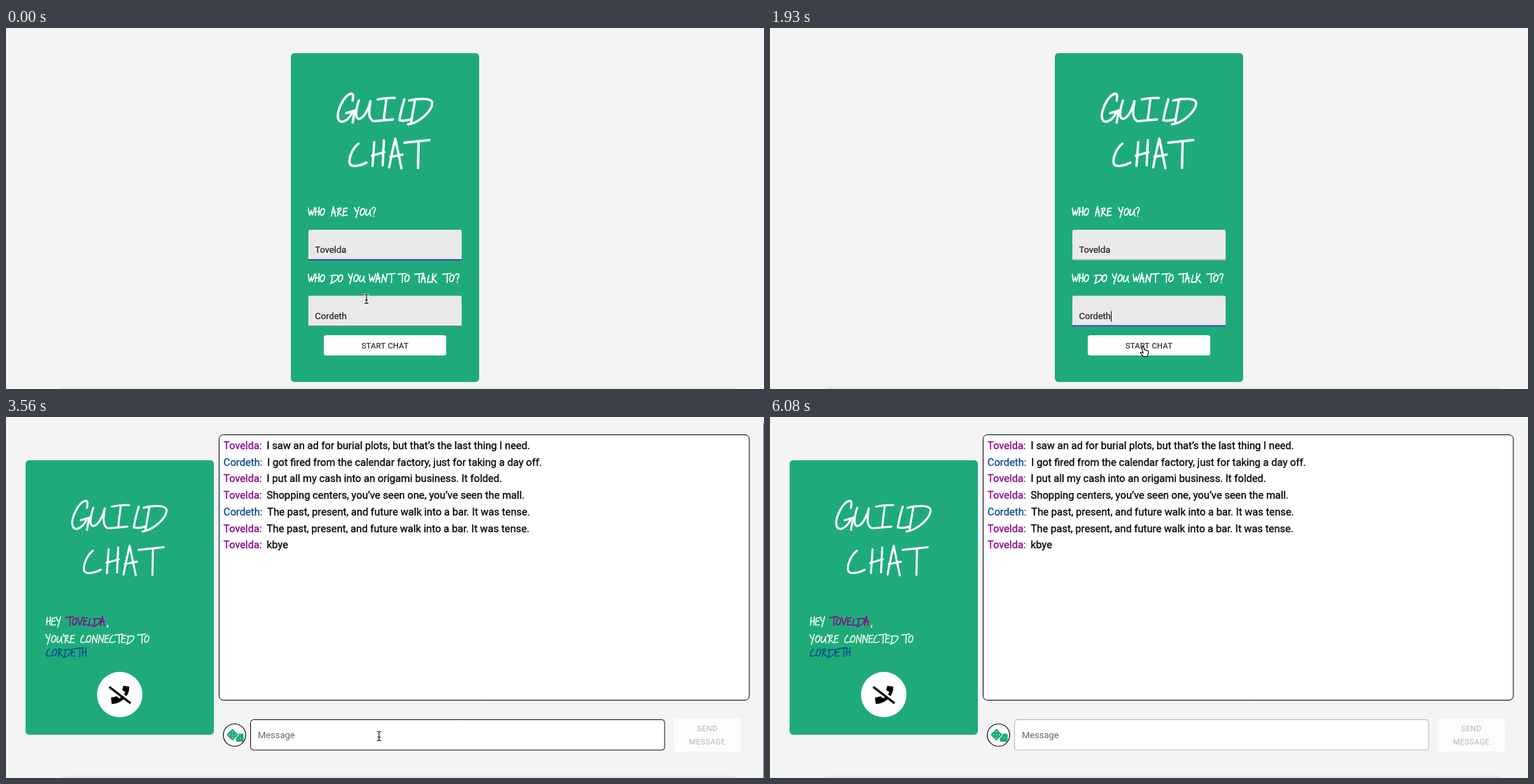
Animation of 1083x517 px, one loop 6.53 s. Source, as an HTML page with a canvas:

```html
<!DOCTYPE html>
<html lang="en">
<head>
<meta charset="utf-8">
<title>Guild Chat</title>
<style>
html, body { margin: 0; width: 100%; height: 100%; overflow: hidden; background: #f4f4f4; }
canvas { display: block; width: 1083px; height: 517px; }
</style>
</head>
<body>
<canvas id="stage" role="img" aria-label="Guild Chat: sign in, then a chat window"></canvas>
<script>
const W = 1083, H = 517, LOOP = 6530, TICK = LOOP / 44;
const canvas = document.getElementById('stage');
const ctx = canvas.getContext('2d');
const ratio = window.devicePixelRatio || 1;
canvas.width = W * ratio;
canvas.height = H * ratio;

const GREEN = '#1eab79', PURPLE = '#8b008b', BLUE = '#0d4a92', INK = '#1c1c1c';
const ME = 'Tovelda', FRIEND = 'Cordeth';

// Handwritten capitals, ten units tall: [advance, strokes]
const titleGlyphs = {
  G: [6.2, 'M5 2.4Q5.5 -.2 4.4 0C2 .6 -.6 6 0 8.6C.7 10.8 3.5 9.4 4.8 6.6M2.8 6.7L5.8 5.8Q5.3 8 5 10'],
  U: [6.2, 'M1 2.4C-.2 6 -.3 8.8 1.1 8.7C2.9 8.4 4.4 5 5 2.6C4.4 6 4.2 8.4 5.8 9.4'],
  I: [7.6, 'M1.2 2Q4 1.4 7.1 1.5M4.2 1.8L3.3 9.2M.1 9.5L6.5 8.9'],
  L: [5, 'M2.2 2Q1 6 .5 9.2Q2.5 9.6 4.6 8.8'],
  D: [8, 'M2.3 2.6L1 10.2M.4 2.4C4 1.6 8.4 1.4 8.3 3.4C8.1 6 4 10 0 10.6'],
  C: [6, 'M3.3 1.2C1.2 2.8 0 6 .2 7.8C.5 9.6 3.5 9 6 7.8'],
  H: [5.2, 'M1 .7L.4 8.9M.2 5.4L4.5 4.2M4.3 .1L3.9 8.7'],
  A: [6, 'M0 9.4Q1 4 2.1 -.5L4.2 9.7M.4 5.8L4.6 5'],
  T: [6.2, 'M-.8 .9L7.8 0M4.1 .4L3.9 9.6']
};
const moreGlyphs = {
  W: [7, 'M0 1Q.6 6 1.2 8.6Q2.6 6 3.2 3.6Q3.4 6 4.2 8.4Q5.8 5 6.6 .6'],
  O: [6.2, 'M3 1.6C.6 2 -.6 8 1.6 8.6C4.6 9 6 3 4 1.6Q3 1 2 2.4'],
  R: [6, 'M1.4 1.4L.6 9.4M.2 2C4 -.4 6 2 1.2 5.4Q3 7.4 5.6 9.4'],
  E: [5.4, 'M1.2 1.6Q.6 5 .4 9L4.6 8.6M.8 5L4 4.4M1 1.6L4.8 1'],
  Y: [5.6, 'M0 .4Q1 4 2.2 4.8M4.6 0Q3 6 1.6 11'],
  N: [6.6, 'M.2 9.4L1.4 1Q3 5 4.6 9Q5 4 6 .4'],
  K: [5.8, 'M1.2 0L.4 9.6M4.8 1Q2 5 .8 5.4Q3 7 5.2 9.8'],
  V: [5.4, 'M0 .8Q1 6 1.8 9Q3.6 5 5.2 .4'],
  '?': [5, 'M.4 2C1.4 -1 5 .4 3.8 3Q2.4 5 2.4 7M2.2 9.4L2.3 9.8'],
  "'": [1.6, 'M.8 0L.6 2'],
  ',': [1.6, 'M.8 9L.2 11.4']
};
const glyphs = { ...titleGlyphs, ...moreGlyphs };
for (const g of Object.values(glyphs)) g[1] = new Path2D(g[1]);

function box(x, y, w, h, r, fill, stroke) {
  ctx.beginPath();
  ctx.roundRect(x, y, w, h, r);
  if (fill) { ctx.fillStyle = fill; ctx.fill(); }
  if (stroke) { ctx.strokeStyle = stroke; ctx.lineWidth = 1; ctx.stroke(); }
}

function disc(x, y, r, fill, stroke) {
  ctx.beginPath();
  ctx.arc(x, y, r, 0, Math.PI * 2);
  ctx.fillStyle = fill;
  ctx.fill();
  if (stroke) { ctx.strokeStyle = stroke; ctx.lineWidth = 1.2; ctx.stroke(); }
}

function text(s, x, y, size, color, { align = 'left', spacing = 0, bold = 0 } = {}) {
  ctx.font = `${size}px Roboto, sans-serif`;
  ctx.letterSpacing = spacing + 'px';
  ctx.textAlign = align;
  ctx.fillStyle = color;
  ctx.fillText(s, x, y);
  if (bold) {
    ctx.strokeStyle = color;
    ctx.lineWidth = bold;
    ctx.strokeText(s, x, y);
  }
  return ctx.measureText(s).width;
}

// Each word is [letters, x]
function write(words, y, size, weight, color = '#fff') {
  ctx.strokeStyle = color;
  ctx.lineCap = ctx.lineJoin = 'round';
  for (const [word, left] of words) {
    let x = left;
    for (const ch of word) {
      const [advance, path] = glyphs[ch];
      ctx.save();
      ctx.translate(x, y);
      ctx.scale(size, size);
      ctx.lineWidth = weight / size;
      ctx.stroke(path);
      ctx.restore();
      x += advance * size;
    }
  }
}

const label = (words, y, weight, color) => write(words, y, 1.35, weight, color);

function title(dx, dy, weight) {
  ctx.save();
  ctx.translate(dx, dy);
  write([['G', 474.5], ['U', 500], ['I', 526], ['L', 560], ['D', 574.5]], 94, 4.15, weight);
  write([['C', 490], ['H', 522], ['A', 547.5], ['T', 572.5]], 160.5, 4.15, weight);
  ctx.restore();
}

function backdrop() {
  ctx.fillStyle = '#f4f4f4';
  ctx.fillRect(0, 0, W, H);
  box(72, 513.5, 978, 40, 14, '#e8e8e8');
}

function field(y, value, line, caret) {
  box(432, y, 219, 43.5, [2, 2, 0, 0], '#e9e9e9');
  ctx.fillStyle = '#8e8e8e';
  ctx.fillRect(432, y + 42.5, 219, 1);
  if (line) {
    ctx.fillStyle = '#3f48b5';
    ctx.fillRect(541.5 - 109.5 * line, y + 42, 219 * line, 2);
  }
  const w = text(value, 441.5, y + 33, 12.9, INK, { bold: 0.2 });
  if (caret) {
    ctx.fillStyle = '#111';
    ctx.fillRect(Math.round(441.5 + w), y + 22, 1, 15);
  }
}

// Radius and strength of the button ripple by step after the press
const ripple = [[21, 0.12], [75, 0.09], [130, 0.05], [180, 0.02]];
const between = (k, a, b) => k >= a && k < b;

function signIn(k) {
  backdrop();
  box(407, 36, 269, 471, 5, GREEN);
  title(0, 0, 3.4);
  label([['WHO', 432], ['ARE', 465], ['YOU?', 498]], 256.5, 1.7);
  const line1 = k < 5 ? 1 : k === 5 ? 0.07 : 0;
  const line2 = k < 5 ? 0 : k === 5 ? 0.6 : k < 20 ? 1 : k === 20 ? 0.07 : 0;
  field(289, ME, line1, between(k, 2, 5));
  label([['WHO', 432], ['DO', 463.5], ['YOU', 489], ['WANT', 519], ['TO', 561],
    ['TALK', 585], ['TO?', 625]], 351.5, 1.7);
  field(383.5, FRIEND, line2, between(k, 5, 8) || between(k, 11, 15) || between(k, 18, 20));

  box(454, 440, 175, 29, 3.5, '#fff');
  if (k >= 20) {
    const [r, a] = ripple[k - 20];
    ctx.save();
    ctx.beginPath();
    ctx.roundRect(454, 440, 175, 29, 3.5);
    ctx.clip();
    disc(534, 456, r, `rgba(0,0,0,${a})`);
    ctx.restore();
  }
  text('START CHAT', 541.5, 458.5, 11.1, INK, { align: 'center', spacing: 0.3, bold: 0.15 });
}

const chat = [
  [ME, 'I saw an ad for burial plots, but that’s the last thing I need.'],
  [FRIEND, 'I got fired from the calendar factory, just for taking a day off.'],
  [ME, 'I put all my cash into an origami business. It folded.'],
  [ME, 'Shopping centers, you’ve seen one, you’ve seen the mall.'],
  [FRIEND, 'The past, present, and future walk into a bar. It was tense.'],
  [ME, 'The past, present, and future walk into a bar. It was tense.'],
  [ME, 'kbye']
];
const phone = new Path2D('M176 386C177 400 164 411 151 411L150 402L158 400L162 403Q168 399 170.5 394L166 391L167.5 385Z');

function stroke(x1, y1, x2, y2, width, color) {
  ctx.beginPath();
  ctx.moveTo(x1, y1);
  ctx.lineTo(x2, y2);
  ctx.lineWidth = width;
  ctx.strokeStyle = color;
  ctx.stroke();
}

function hangUp() {
  disc(162.5, 397.5, 32.5, '#fff');
  ctx.fillStyle = '#000';
  ctx.fill(phone);
  ctx.lineCap = 'butt';
  stroke(149, 384, 180, 408, 3, '#fff');
  stroke(147.5, 386.5, 178, 410, 3.2, '#000');
}

function dice() {
  disc(326.5, 455.5, 16, '#fcfcfc', '#111');
  box(328.5, 453.5, 11, 11.5, 1.5, GREEN);
  ctx.save();
  ctx.translate(323.5, 455);
  ctx.rotate(Math.PI / 4);
  box(-6.5, -6.5, 13, 13, 1.5, GREEN, '#fcfcfc');
  for (const x of [-3, 3]) for (const y of [-3, 3]) disc(x, y, 0.7, '#fff');
  disc(0, 0, 0.7, '#fff');
  ctx.restore();
  disc(335, 460, 0.7, '#fff');
}

function chatRoom(k, hover) {
  backdrop();
  box(28, 62, 269, 393, 5, GREEN);
  title(-379.5, 26, 2.9);
  label([['HEY', 57.5], [',', 144.5]], 286, 1.45);
  label([[ME.toUpperCase(), 86]], 286, 1.45, PURPLE);
  label([["YOU'RE", 57], ['CONNECTED', 106.5], ['TO', 189]], 311, 1.45);
  label([[FRIEND.toUpperCase(), 57.5]], 330.5, 1.45, BLUE);
  hangUp();

  box(304.5, 25.5, 757.5, 380, 6, '#fff', '#000');
  chat.forEach(([who, line], i) => {
    const y = 46 + i * 23.72;
    const w = text(who + ':', 310.8, y, 14.75, who === ME ? PURPLE : BLUE, { bold: 0.3 });
    text(line, 310.8 + w + 7, y, 14.75, '#000', { bold: 0.3 });
  });

  dice();
  box(349.5, 433.5, 591.5, 43.5, 4, '#fff', hover ? '#111' : '#b4b4b4');
  text('Message', 360, 459.5, 12.9, '#666');
  box(954, 431.5, 96, 47.5, 3, '#fdfdfd');
  const grey = { align: 'center', spacing: 0.3 };
  text('SEND', 1002, 450, 11.1, '#b4b4b4', grey);
  text('MESSAGE', 1002, 469, 11.1, '#b4b4b4', grey);

  const bar = Math.max(0, Math.min(1, (33 - k) / 4));
  if (bar) {
    ctx.fillStyle = `rgba(110,110,110,${bar})`;
    ctx.fillRect(1082, 9, 1, 508);
  }
}

// Pointer stops: tick, x, y
const stops = [
  [0, 515, 388], [3, 515, 411], [9, 515, 411], [13, 533, 457], [27, 533, 457],
  [30, 322, 456], [31, 322, 456], [35, 533, 219], [40, 1059, 492]
];

function pointerAt(k) {
  const i = stops.findIndex(s => s[0] >= k);
  if (i < 0) return null;
  if (i === 0) return stops[0].slice(1);
  const [t0, x0, y0] = stops[i - 1], [t1, x1, y1] = stops[i];
  const u = (k - t0) / (t1 - t0), e = u * u * (3 - 2 * u);
  return [x0 + (x1 - x0) * e, y0 + (y1 - y0) * e];
}

const beam = new Path2D('M-2.5 -6.5Q0 -6.5 0 -5Q0 -6.5 2.5 -6.5M0 -5L0 5M-2.5 6.5Q0 6.5 0 5Q0 6.5 2.5 6.5M-1.5 1.5L1.5 1.5');
const arrow = new Path2D('M0 0L0 11.2L2.6 8.8L4.4 12.8L6.2 12L4.5 8.2L7.8 8.2Z');
const hand = new Path2D('M-1 0Q.4 -1 1.2 .5L2 4Q3.4 3.4 4 4.6Q5.4 4 6 5.2Q7.6 5 7.7 6.5Q8 9 6.6 11.2L6.4 13.5L0 13.5Q-1.2 11 -3.6 8.6Q-4 6.6 -1.4 7.6L0 8.4L-1.6 1.6Z');

function pointer(x, y, kind) {
  ctx.save();
  ctx.translate(x, y);
  ctx.lineCap = ctx.lineJoin = 'round';
  if (kind === 'hand') {
    ctx.fillStyle = '#fff';
    ctx.strokeStyle = '#000';
    ctx.lineWidth = 1.1;
    ctx.fill(hand);
    ctx.stroke(hand);
  } else {
    const path = kind === 'beam' ? beam : arrow;
    ctx.strokeStyle = '#fff';
    ctx.lineWidth = 2.6;
    ctx.stroke(path);
    ctx.strokeStyle = ctx.fillStyle = '#000';
    ctx.lineWidth = 1.1;
    if (path === beam) ctx.stroke(path);
    else ctx.fill(path);
  }
  ctx.restore();
}

const inside = (p, x0, y0, x1, y1) => p && p[0] > x0 && p[0] < x1 && p[1] > y0 && p[1] < y1;

function draw(now) {
  const k = Math.floor((now % LOOP + 9.9) / TICK) % 44;
  const p = pointerAt(k);
  ctx.setTransform(ratio, 0, 0, ratio, 0, 0);
  let kind = 'arrow';
  if (k < 24) {
    signIn(k);
    if (k === 23 || inside(p, 432, 383, 651, 428)) kind = 'beam';
    else if (inside(p, 454, 440, 629, 469)) kind = 'hand';
  } else {
    const hover = inside(p, 349, 433, 942, 478);
    chatRoom(k, hover);
    if (hover) kind = 'beam';
    else if (inside(p, 310, 439, 343, 472)) kind = 'hand';
  }
  if (p) pointer(p[0], p[1], kind);
}

const start = performance.now();
function loop() {
  draw(performance.now() - start);
  requestAnimationFrame(loop);
}
loop();
</script>
</body>
</html>
```
